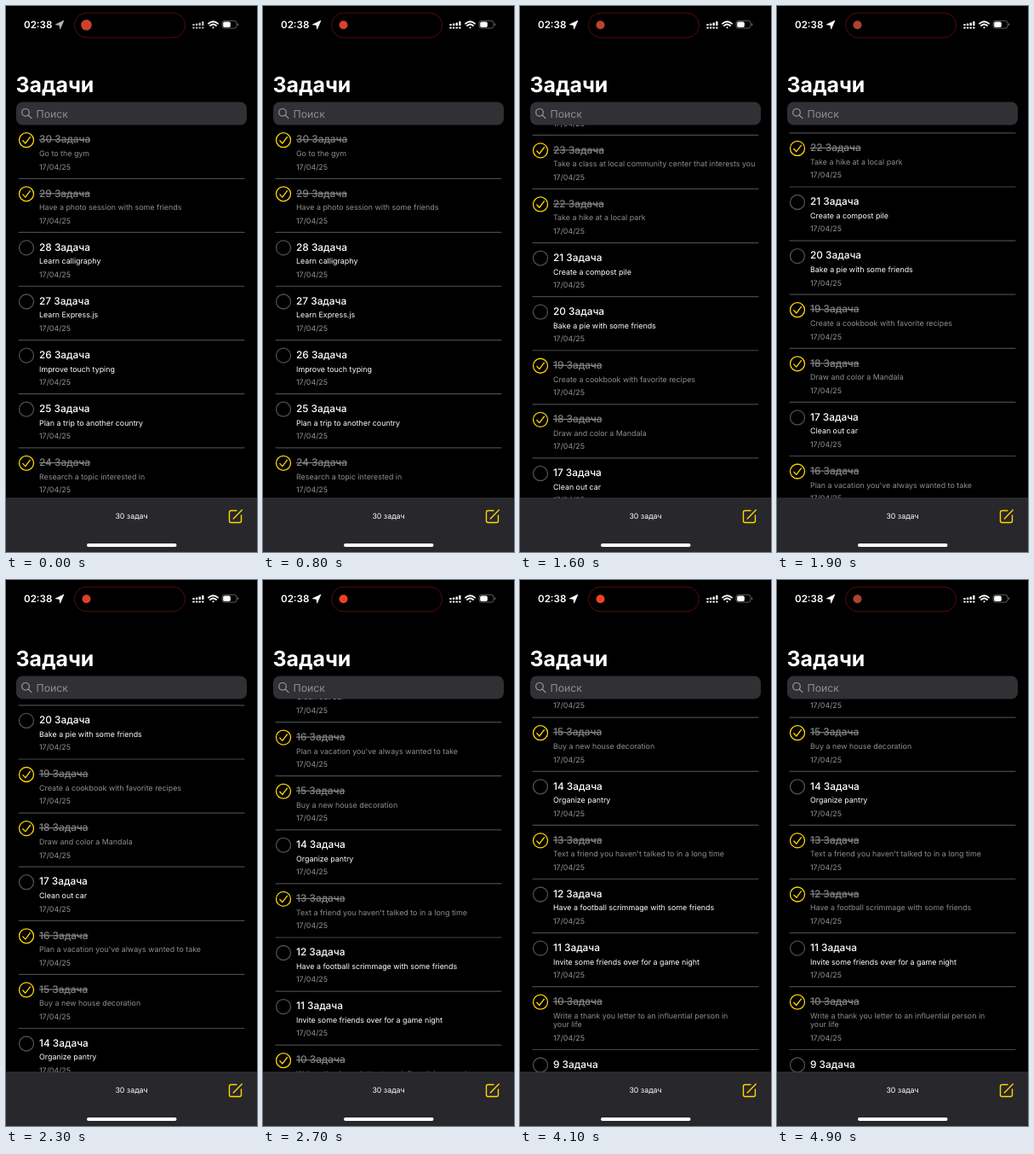
An HTML page for the animation above (5000 ms loop, 295 px wide and 640 px high).

```html
<!DOCTYPE html>
<html lang="ru">
<head>
<meta charset="utf-8">
<title>Задачи</title>
<style>
html, body { margin: 0; width: 100%; height: 100%; overflow: hidden; background: #000; }
svg { display: block; width: 295px; height: 640px; font-family: Inter, "Open Sans", sans-serif; text-rendering: geometricPrecision; }
text { fill: #fff; }
path, circle { fill: none; stroke-linecap: round; stroke-linejoin: round; }
.title { font-size: 11.85px; font-weight: 500; }
.note, .date { font-size: 8.88px; }
.date { fill: #939395; }
.sep { stroke: #48484b; stroke-width: 1.2; }
.ring { stroke: #4b5157; stroke-width: 1.3; }
.check { stroke: #fed702; stroke-width: 1.3; display: none; }
.done .title { fill: #828284; text-decoration: line-through; }
.done .note { fill: #8e8e90; }
.done .ring { stroke: #fed702; }
.done .check { display: inline; }
</style>
</head>
<body>
<svg viewBox="0 0 295 640">
  <clipPath id="view"><rect y="139" width="295" height="438"/></clipPath>
  <g clip-path="url(#view)"><g id="list"></g></g>

  <text x="21" y="26.4" font-size="11.6" font-weight="600">02:38</text>
  <g id="status" fill="#fff">
    <polygon points="68,17 58.2,21.8 62.8,22.4 63.6,27.2" stroke="#fff" stroke-width=".6" stroke-linejoin="round"/>
    <g id="bars"></g>
  </g>
  <rect x="80.5" y="8" width="130" height="29" rx="14.5" stroke="#560d0d"/>
  <circle id="dot" cx="94.5" cy="22.2" style="fill:#f04024"/>
  <g stroke="#fff" stroke-width="1.9">
    <path d="M238 20.6Q243.5 15.8 249 20.6M240 23Q243.5 20 247 23"/>
    <path d="M243.5 25.3v.1"/>
  </g>
  <rect x="254" y="17.3" width="17" height="8.8" rx="2.8" fill="none" stroke="#77777a" stroke-width=".8"/>
  <rect x="255.2" y="18.5" width="8.6" height="6.4" rx="1.7" fill="#fff"/>
  <path d="M272.7 20.8v1.8" stroke="#77777a"/>

  <text x="11.5" y="100.6" font-size="24.9" font-weight="700">Задачи</text>
  <rect x="12" y="112.5" width="271" height="27" rx="7.5" fill="#313035"/>
  <g stroke="#98989d" stroke-width="1.2">
    <circle cx="23" cy="124.8" r="4.3"/>
    <path d="M26.2 128L30 131.6"/>
  </g>
  <text x="35.5" y="130.5" font-size="12.3" style="fill:#8e8e93">Поиск</text>

  <rect y="577" width="295" height="63" fill="#28272b"/>
  <rect y="576.5" width="295" height="1" fill="#39393c"/>
  <text x="147.5" y="601" font-size="8.8" text-anchor="middle">30 задач</text>
  <path d="M271 591.5H264.5Q262.5 591.5 262.5 593.5V603.5Q262.5 605.5 264.5 605.5H274.5Q276.5 605.5 276.5 603.5V597M268 600.2L277.3 590.8M268 600.2L267.3 601" stroke="#fed702" stroke-width="1.4"/>
  <rect x="95" y="630" width="105.5" height="4" rx="2" fill="#fff"/>
</svg>
<script>
const LOOP = 5000, PITCH = 63.1, LINE = 10.7, TOGGLE_AT = 4200;
// "+" marks a finished task, "|" breaks the line
const tasks = [
  '+Go to the gym', '+Have a photo session with some friends', 'Learn calligraphy',
  'Learn Express.js', 'Improve touch typing', 'Plan a trip to another country',
  '+Research a topic interested in', '+Take a class at local community center that interests you',
  '+Take a hike at a local park', 'Create a compost pile', 'Bake a pie with some friends',
  '+Create a cookbook with favorite recipes', '+Draw and color a Mandala', 'Clean out car',
  "+Plan a vacation you've always wanted to take", '+Buy a new house decoration',
  'Organize pantry', "+Text a friend you haven't talked to in a long time",
  'Have a football scrimmage with some friends', 'Invite some friends over for a game night',
  '+Write a thank you letter to an influential person in|your life', ''
];
const $ = id => document.getElementById(id);

let rowY = 156;
$('list').innerHTML = tasks.map((task, i) => {
  const lines = task.replace('+', '').split('|');
  const extra = (lines.length - 1) * LINE;
  const row = `<g class="${task[0] === '+' ? 'done' : ''}" transform="translate(0 ${rowY})">
    ${i ? '<path class="sep" d="M15 -16.8H280"/>' : ''}
    <circle class="ring" cx="24" cy="1.2" r="8.5"/>
    <path class="check" d="M19.8 1.8L22.8 5L28.4 -2.4"/>
    <text class="title" x="39" y="4.4">${30 - i} Задача</text>
    ${lines.map((s, k) => `<text class="note" x="39" y="${20.2 + k * LINE}">${s}</text>`).join('')}
    <text class="date" x="39" y="${35.6 + extra}">17/04/25</text></g>`;
  rowY += PITCH + extra;
  return row;
}).join('');
const toggled = $('list').children[18];

$('bars').innerHTML = [2, 2.4, 3.6, 5].map((h, i) => {
  const x = 219.3 + i * 3.6;
  return `<rect x="${x}" y="${23 - h}" width="2.4" height="${h}" rx=".5"/>
    <rect x="${x}" y="24.4" width="2.4" height="2.2" rx=".5"/>`;
}).join('');

// Two flicks, each slowing down
const flick = t => 578 * (1 - Math.exp(-(t - 900) / 515));
function offset(t) {
  if (t < 900) return 0;
  if (t < 2200) return flick(t);
  const from = flick(2200), u = Math.min(1, (t - 2200) / 1000);
  return from + (924.5 - from) * (1 - (1 - u) ** 2.52);
}

function draw(now) {
  const t = Math.floor(now % LOOP / 100) * 100;
  const intro = Math.min(1, t / 400);
  const pulse = .5 + .5 * Math.cos((t - 1100) / 1500 * 2 * Math.PI);
  $('list').setAttribute('transform', `translate(0 ${-offset(t)})`);
  toggled.classList.toggle('done', t >= TOGGLE_AT);
  $('status').setAttribute('opacity', .72 + .28 * intro);
  $('dot').setAttribute('r', 6.3 - 1.3 * intro);
  $('dot').style.fill = `rgb(${172 + 70 * pulse},${68 - 4 * pulse},${48 - 10 * pulse})`;
}
const start = performance.now();
function tick() {
  draw(performance.now() - start);
  requestAnimationFrame(tick);
}
tick();
</script>
</body>
</html>
```
